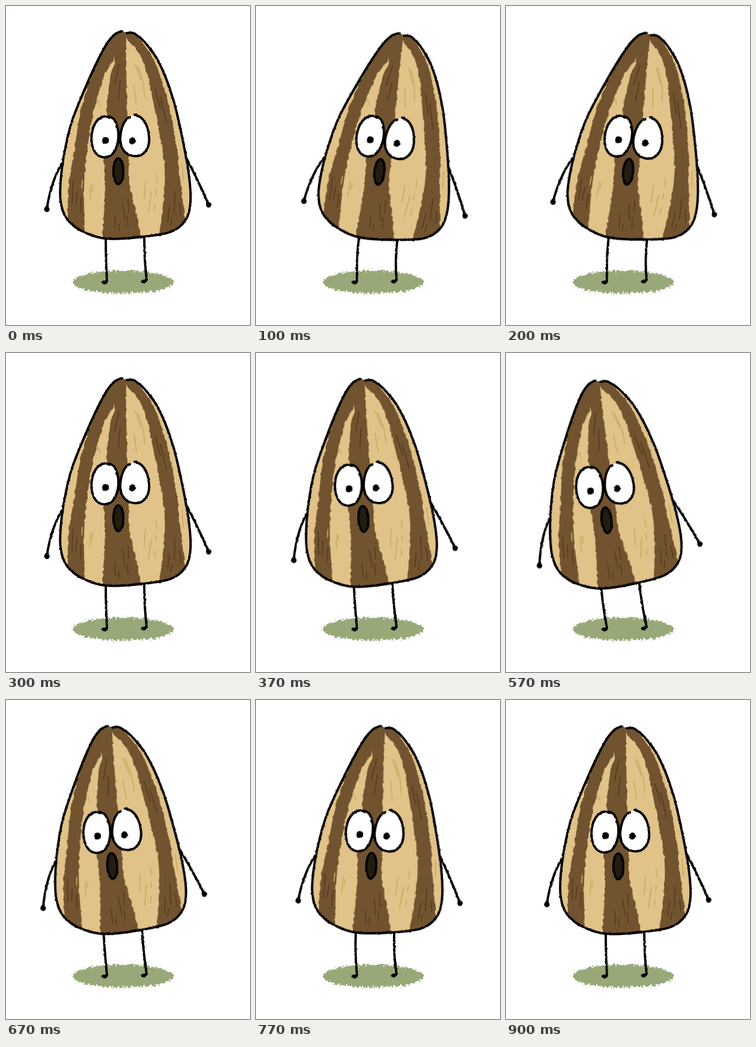
Animation, 406 px wide and 531 px high, one loop 1.07 s. Source, as an HTML page:

```html
<!DOCTYPE html>
<html lang="en">
<head>
<meta charset="utf-8">
<title>Swaying seed</title>
<style>
html, body { margin: 0; width: 100%; height: 100%; overflow: hidden; background: #fff; }
svg { display: block; width: 100%; height: 100%; }
.ink { fill: none; stroke: #000; stroke-width: 3.9; stroke-linecap: round; stroke-linejoin: round; }
.grain { fill: none; stroke-width: 1.7; stroke-linecap: round; }
</style>
</head>
<body>
<svg viewBox="0 0 406 531" preserveAspectRatio="none">
  <defs>
    <filter id="rough" filterUnits="userSpaceOnUse" x="0" y="0" width="406" height="531" color-interpolation-filters="sRGB">
      <feTurbulence type="fractalNoise" baseFrequency=".22" numOctaves="2" seed="4"/>
      <feDisplacementMap in="SourceGraphic" scale="2.6" xChannelSelector="R" yChannelSelector="G"/>
    </filter>
    <filter id="wavy" filterUnits="userSpaceOnUse" x="0" y="0" width="406" height="531" color-interpolation-filters="sRGB">
      <feTurbulence type="fractalNoise" baseFrequency=".11" numOctaves="2" seed="9"/>
      <feDisplacementMap in="SourceGraphic" scale="5" xChannelSelector="R" yChannelSelector="G"/>
    </filter>
    <filter id="chalk" filterUnits="userSpaceOnUse" x="0" y="400" width="406" height="131" color-interpolation-filters="sRGB">
      <feTurbulence type="fractalNoise" baseFrequency=".28" numOctaves="3" seed="2"/>
      <feDisplacementMap in="SourceGraphic" scale="11" xChannelSelector="R" yChannelSelector="G"/>
    </filter>
    <clipPath id="hull"><path id="hullPath"/></clipPath>
  </defs>

  <ellipse cx="195" cy="459.5" rx="84" ry="19" fill="#98a878" filter="url(#chalk)"/>

  <g filter="url(#rough)">
    <path id="legL" class="ink"/>
    <path id="legR" class="ink"/>
    <ellipse cx="163.5" cy="460.3" rx="5" ry="3.2"/>
    <ellipse cx="229.5" cy="458.6" rx="5" ry="3.2"/>
  </g>

  <g id="body">
    <g filter="url(#rough)">
      <path class="ink" stroke-width="3.5" d="M93 262Q75 292 68 337M301 255Q318 287 337 330"/>
      <circle cx="68" cy="338.5" r="4.6"/>
      <circle cx="337.3" cy="331" r="4.6"/>
    </g>
    <g clip-path="url(#hull)">
      <rect width="406" height="531" fill="#e1c288"/>
      <g id="stripes" fill="#71532f" filter="url(#wavy)"></g>
      <path id="darkGrain" class="grain" stroke="#573c1b"/>
      <path id="lightGrain" class="grain" stroke="#cbaa62"/>
    </g>
    <g filter="url(#rough)">
      <path id="outline" class="ink"/>
      <path id="eyeL" class="ink" style="fill:#fff"/>
      <path id="eyeR" class="ink" style="fill:#fff"/>
      <ellipse cx="165.3" cy="224" rx="5.3" ry="6"/>
      <ellipse cx="210" cy="224.6" rx="5.5" ry="6"/>
      <ellipse class="ink" cx="187" cy="275" rx="8.3" ry="21.5" style="fill:#251c11"/>
    </g>
  </g>
</svg>
<script>
const $ = id => document.getElementById(id);
const draw = (id, d) => $(id).setAttribute('d', d);

// Smooth open curve through the given points
function curve(pts, start = 'M') {
  let d = start + pts[0];
  for (let i = 0; i < pts.length - 1; i++) {
    const a = pts[i - 1] || pts[i], b = pts[i], c = pts[i + 1], e = pts[i + 2] || c;
    const h1 = [b[0] + (c[0] - a[0]) / 6, b[1] + (c[1] - a[1]) / 6];
    const h2 = [c[0] - (e[0] - b[0]) / 6, c[1] - (e[1] - b[1]) / 6];
    d += `C${h1} ${h2} ${c}`;
  }
  return d;
}

const hull = curve([
  [193, 41.5], [181, 47], [167, 64], [149, 98], [129, 143], [109, 194], [97, 245],
  [91, 290], [91, 326], [101, 354], [125, 374], [165, 387], [220, 385], [274, 376],
  [299, 356], [307, 325], [303, 272], [285, 181], [272, 136], [255, 95],
  [235, 65], [214, 46], [201, 45]
]);
draw('hullPath', hull + 'Z');
draw('outline', hull);

function stripe(left, right) {
  const p = document.createElementNS('http://www.w3.org/2000/svg', 'path');
  p.setAttribute('d', curve(left) + curve(right.reverse(), 'L') + 'Z');
  $('stripes').append(p);
}
stripe([[188, 38], [165, 64], [149, 99], [132, 146], [121, 192], [113, 245], [104, 300], [103, 378]],
       [[200, 46], [181, 86], [165, 112], [152, 152], [142, 194], [135, 242], [130, 300], [131, 382]]);
stripe([[184, 40], [181, 88], [171, 135], [167, 185], [163, 250], [165, 300], [160, 395]],
       [[200, 40], [200, 100], [202, 180], [204, 260], [207, 303], [216, 343], [228, 395]]);
stripe([[195, 40], [203, 57], [222, 80], [235, 113], [245, 160], [261, 245], [264, 300], [254, 390]],
       [[212, 38], [226, 59], [242, 83], [254, 109], [270, 162], [285, 240], [290, 290], [300, 370]]);

draw('darkGrain', 'M188 97L181 131M190 124L187 157M111 293L110 331M118 309L116 330M125 319L124 343'
  + 'M203 321L204 342M194 328L198 356M181 349L182 371M188 363V374M202 350L203 368'
  + 'M248 138L257 171M257 152L267 194M281 309L280 345M289 329L291 349M272 334L269 359M276 352L274 364');
draw('lightGrain', 'M215 97L225 124M219 99L228 126M228 125L231 152M213 133L217 165M141 297L140 322'
  + 'M145 299L143 309M250 280L251 294M250 305L249 314M232 293L230 321M242 309L237 344M248 330L247 340'
  + 'M152 155L156 165M293 262L295 290M127 290L126 303');

draw('eyeL', 'M172 186C163 180 149 187 144 206C139 226 144 251 164 252C181 251 188 231 187 211C185 192 179 184 169 184');
draw('eyeR', 'M206 185C196 189 191 205 190 220C190 240 201 250 216 250C231 250 240 235 238 217C236 199 229 184 214 181');

// [start ms, lean in degrees, x shift, y shift]
const loop = 1070, pivot = [187, 430];
const poses = [
  [0, 0, 0, 0], [70, 3.6, 0, 0], [100, 6.8, 0, 0], [170, 6.9, 0, 0], [200, 6, 0, 0], [270, 3.3, 0, 0],
  [300, 0, 0, 0], [370, -2.7, -1, 1], [400, -4.8, -2, 2], [470, -6.1, -3.2, 2.5], [500, -6.5, -3.3, 2.5],
  [570, -6.1, -3.2, 2.5], [600, -5, -2, 1.8], [670, -3.4, -1, 1], [700, -0.6, -1.2, 0.8],
  [770, 2.5, -1.9, 0.8], [870, 1.4, -1, 1.5], [900, 0, 0, 2]
];

function leg(id, hip, foot, [, deg, dx, dy]) {
  const a = deg * Math.PI / 180, s = Math.sin(a), c = Math.cos(a);
  const place = y => {
    const x = hip[0] - pivot[0], v = y - pivot[1];
    return [pivot[0] + x * c - v * s + dx, pivot[1] + x * s + v * c + dy];
  };
  draw(id, `M${place(hip[1])}Q${place(hip[1] + 38)} ${foot}l-7 2.5`);
}

const begin = performance.now();
let shown;
function tick() {
  const t = (performance.now() - begin) % loop;
  const pose = poses.findLast(p => p[0] <= t);
  if (pose !== shown) {
    shown = pose;
    const [, deg, dx, dy] = pose;
    $('body').setAttribute('transform', `translate(${dx} ${dy}) rotate(${deg} ${pivot})`);
    leg('legL', [166, 385], [168, 458], pose);
    leg('legR', [230, 383], [234, 456], pose);
  }
  requestAnimationFrame(tick);
}
tick();
</script>
</body>
</html>
```
